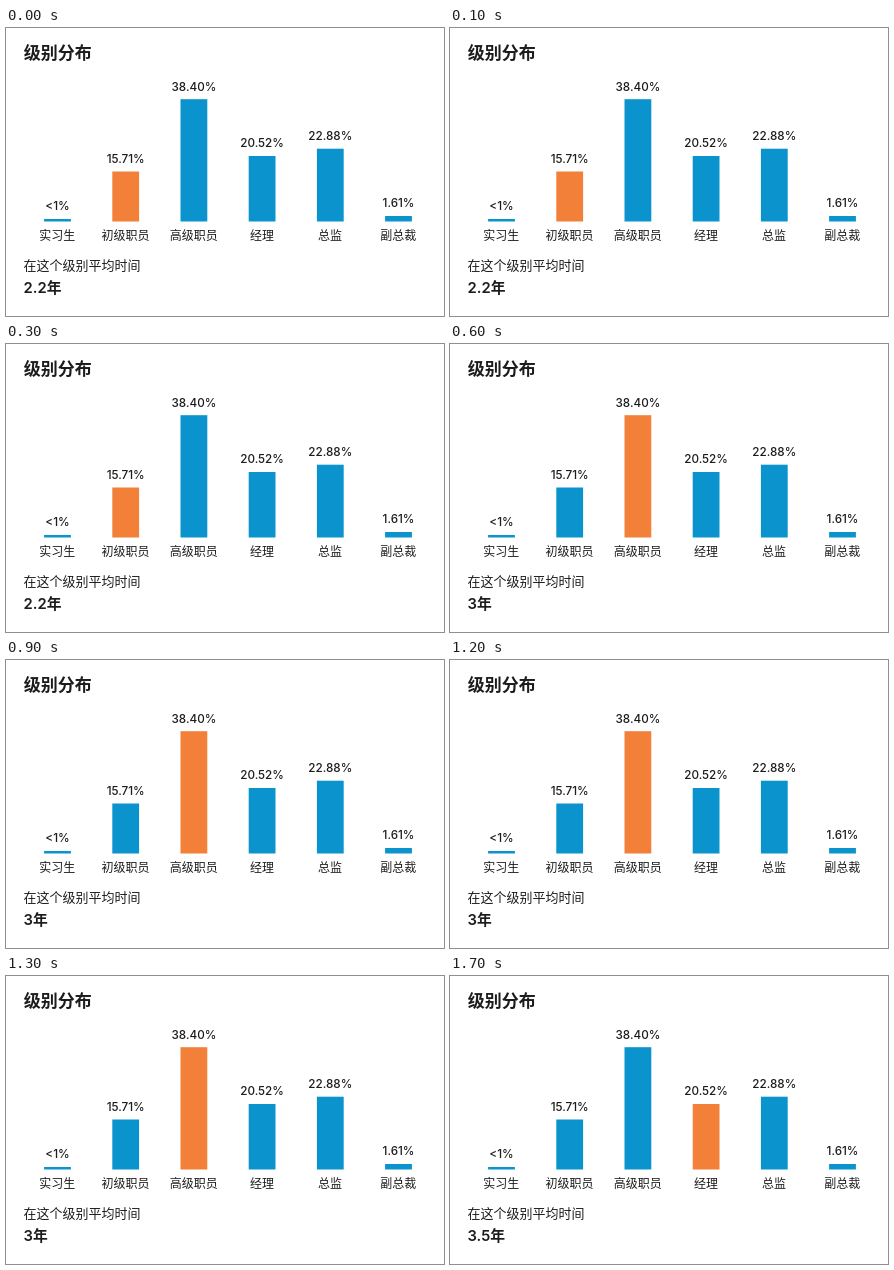
An HTML page that plays this animation: 438 px wide and 288 px high, repeating every 2.6 s.

```html
<!DOCTYPE html>
<html lang="zh-CN">
<meta charset="utf-8">
<title>级别分布</title>
<style>
html, body { margin: 0; width: 100%; height: 100%; overflow: hidden; background: #fff; }
svg { display: block; }
text { font: 12px Inter, "Noto Sans CJK SC", "Noto Sans CJK", sans-serif; fill: #1c1c1c; }
.bar text { text-anchor: middle; }
.bar .share { font-size: 11.7px; font-weight: 450; }
#title { font-size: 17px; font-weight: 700; }
#caption { font-size: 13px; }
#years { font-size: 14.8px; font-weight: 600; }
</style>
<svg width="438" height="288" viewBox="0 0 438 288">
  <rect width="438" height="288" fill="#fff"/>
  <text id="title" x="17.7" y="31">级别分布</text>
  <g id="chart"></g>
  <text id="caption" x="17.4" y="242">在这个级别平均时间</text>
  <text id="years" x="17.5" y="265"></text>
</svg>
<script>
const LOOP = 2600, BASE = 193.5, BLUE = '#0a93cd', ORANGE = '#f28039';
const levels = [
  ['实习生', '<1%', 191],
  ['初级职员', '15.71%', 143.5],
  ['高级职员', '38.40%', 71.2],
  ['经理', '20.52%', 128],
  ['总监', '22.88%', 120.7],
  ['副总裁', '1.61%', 188]
];
// start time, highlighted bar, years shown
const steps = [[0, 1, '2.2年'], [600, 2, '3年'], [1700, 3, '3.5年']];

const chart = document.getElementById('chart');
const years = document.getElementById('years');

function add(parent, tag, attrs, text = '') {
  const el = document.createElementNS('http://www.w3.org/2000/svg', tag);
  for (const key in attrs) el.setAttribute(key, attrs[key]);
  el.textContent = text;
  return parent.appendChild(el);
}

const bars = levels.map(([name, share, top], i) => {
  const x = 51.5 + i * 68.2;
  const g = add(chart, 'g', { class: 'bar' });
  add(g, 'text', { x, y: top - 8.6, class: 'share' }, share);
  add(g, 'text', { x: x - 0.2, y: 211.5 }, name);
  return add(g, 'rect', { x: x - 13.4, y: top, width: 26.8, height: BASE - top });
});

function draw(now) {
  const t = now % LOOP;
  const [, active, label] = steps.findLast(([start]) => t >= start);
  bars.forEach((bar, i) => bar.setAttribute('fill', i === active ? ORANGE : BLUE));
  years.textContent = label;
}

const begin = performance.now();
function frame() {
  draw(performance.now() - begin);
  requestAnimationFrame(frame);
}
frame();
</script>
</html>
```
